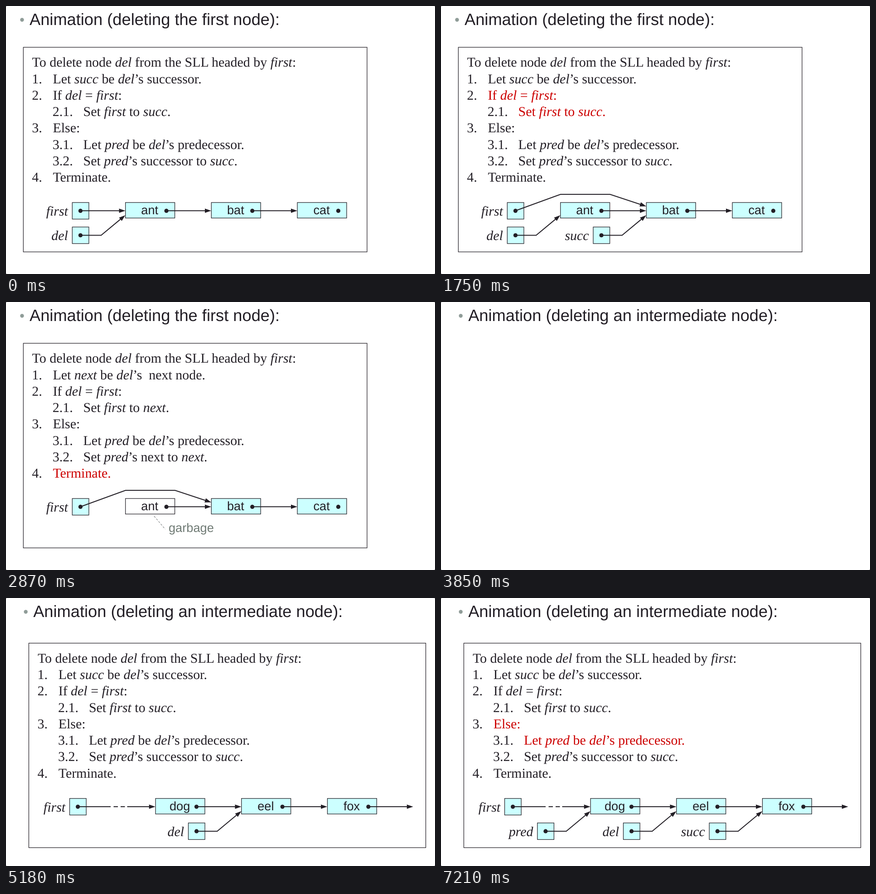
Recreate the animation shown at these times as an HTML page. Size 947 by 592 pixels, loop 8 s.

```html
<!DOCTYPE html>
<html lang="en">
<head>
<meta charset="utf-8">
<title>Deleting a node from a linked list</title>
<style>
html, body { margin: 0; width: 100%; height: 100%; overflow: hidden; background: #fff; }
svg { display: block; width: 947px; height: 592px; }
text {
  white-space: pre; fill: #231f26; text-rendering: geometricPrecision;
  font-kerning: none; font-variant-ligatures: none;
}
.title { font: 36.25px "Liberation Sans", Arial, sans-serif; }
.node { font: 27.2px "Liberation Sans", Arial, sans-serif; }
.step { font: 29.93px "Liberation Serif", "Times New Roman", serif; }
.it { font-style: italic; }
.red { fill: #cc0000; }
.gray { fill: #6f7a74; }
.box { stroke: #231f26; stroke-width: 1.25; }
.line { fill: none; stroke: #231f26; stroke-width: 2; }
.ink { fill: #231f26; }
</style>
</head>
<body>
<svg id="stage" viewBox="0 0 947 592"></svg>
<script>
const LOOP = 8000;
const CYAN = '#ccffff';
const SIDE = 36.6, NODE_W = 108.9, NODE_H = 34.3;

const SUCC_STEPS = [
  ['1.', 'Let *succ* be *del*’s successor.'],
  ['2.', 'If *del* = *first*:'],
  ['2.1.', 'Set *first* to *succ*.'],
  ['3.', 'Else:'],
  ['3.1.', 'Let *pred* be *del*’s predecessor.'],
  ['3.2.', 'Set *pred*’s successor to *succ*.'],
  ['4.', 'Terminate.']
];
const NEXT_STEPS = SUCC_STEPS.map(s => [...s]);
NEXT_STEPS[0][1] = 'Let *next* be *del*’s  next node.';
NEXT_STEPS[2][1] = 'Set *first* to *next*.';
NEXT_STEPS[5][1] = 'Set *pred*’s next to *next*.';

const text = (x, y, cls, s, anchor = 'start') =>
  `<text x="${x}" y="${y}" class="${cls}" text-anchor="${anchor}">${s}</text>`;
const rect = (x, y, w, h, fill) =>
  `<rect class="box" x="${x}" y="${y}" width="${w}" height="${h}" fill="${fill}"/>`;
const dot = (x, y) => `<circle class="ink" cx="${x}" cy="${y}" r="4.6"/>`;
const line = pts => `<polyline class="line" points="${pts.join(' ')}"/>`;

// *word* becomes italic
const rich = s => s.split('*')
  .map((p, i) => i % 2 ? `<tspan class="it">${p}</tspan>` : p).join('');

// Polyline that ends in a filled arrowhead
function arrow(...pts) {
  const [x, y] = pts[pts.length - 1], [px, py] = pts[pts.length - 2];
  const a = Math.atan2(y - py, x - px) * 180 / Math.PI;
  const r = a * Math.PI / 180;
  const neck = [x - 12 * Math.cos(r), y - 12 * Math.sin(r)];
  return line([...pts.slice(0, -1), neck]) +
    `<path class="ink" d="M0 0L-14 -4.8V4.8Z" transform="translate(${x} ${y}) rotate(${a})"/>`;
}

const title = (x, s) =>
  `<circle cx="${x - 16.6}" cy="30.5" r="4.2" fill="#8f9c98"/>` + text(x, 41.5, 'title', s);

function steps(dx, dy, list, red) {
  const top = 134.3 + dy;
  let out = text(57.6 + dx, top, 'step',
    rich('To delete node *del* from the SLL headed by *first*:'));
  list.forEach(([num, body], i) => {
    const sub = num.length > 2, y = top + 36.25 * (i + 1);
    out += text((sub ? 102.8 : 57.3) + dx, y, 'step', num);
    out += text((sub ? 170.6 : 103.4) + dx, y,
      red.includes(i) ? 'step red' : 'step', rich(body));
  });
  return out;
}

function node(x, y, name, fill = CYAN) {
  return rect(x, y, NODE_W, NODE_H, fill) +
    text(x + NODE_W / 2 - 0.9, y + 26, 'node', name, 'middle') +
    dot(x + 90.4, y + 18.3);
}

const variable = (x, y, name) => rect(x, y, SIDE, SIDE, CYAN) +
  text(x - 9.4, y + 29.2, 'step it', name, 'end') + dot(x + 18.1, y + 18.3);

// Variable in the lower row, pointing up at the next node
const lower = (x, y, name) => variable(x, y, name) +
  arrow([x + 18.1, y + 18.3], [x + 63.7, y + 18.3], [x + 117, y - 26]);

function firstScene({ list = SUCC_STEPS, red = [], succ, moved, done }) {
  const y = 434.1, mid = y + 18.2, low = 488.2;
  let out = title(52, 'Animation (deleting the first node):') +
    rect(38.3, 91.2, 758.7, 452, 'none') + steps(0, 0, list, red) +
    variable(146.3, y, 'first') +
    node(263.7, y, 'ant', done ? '#fff' : CYAN) +
    node(453.3, y, 'bat') + node(643.1, y, 'cat') +
    arrow([354, mid], [453, mid]) + arrow([543.6, mid], [643, mid]);
  out += moved
    ? arrow([164.4, mid], [264, 416], [373, 416], [453, 442.5])
    : arrow([164.4, mid], [263.5, mid]);
  if (done) {
    out += '<path d="M327 473L351.5 502" fill="none" stroke="#85898a" stroke-width="1.2" stroke-dasharray="4.5 3"/>' +
      text(359, 508, 'node gray', 'garbage');
  } else {
    out += lower(146.3, low, 'del');
  }
  if (succ) out += lower(336, low, 'succ');
  return out;
}

const middleTitle = () => title(60.2, 'Animation (deleting an intermediate node):');

function middleScene({ red = [], succ, pred }) {
  const y = 442.8, mid = y + 18.2, low = 496.9;
  let out = middleTitle() +
    rect(50.4, 99.7, 876.2, 451.8, 'none') + steps(12.3, 8.6, SUCC_STEPS, red) +
    variable(140.5, y, 'first') +
    line([[158.6, mid], [231, mid]]) + line([[237.5, mid], [247, mid]]) +
    line([[253, mid], [262.5, mid]]) + arrow([267.5, mid], [329.7, mid]);
  ['dog', 'eel', 'fox'].forEach((name, i) => {
    const x = 330.1 + 189.7 * i;
    out += node(x, y, name) + arrow([x + 90.4, mid], [x + 189.3, mid]);
  });
  out += lower(402.5, low, 'del');
  if (succ) out += lower(592.2, low, 'succ');
  if (pred) out += lower(212.8, low, 'pred');
  return out;
}

const scenes = [
  [0, firstScene({})],
  [700, firstScene({ red: [0], succ: true })],
  [1750, firstScene({ red: [1, 2], succ: true, moved: true })],
  [2800, firstScene({ list: NEXT_STEPS, red: [6], moved: true, done: true })],
  [3850, middleTitle()],
  [5040, middleScene({})],
  [6090, middleScene({ red: [0], succ: true })],
  [7210, middleScene({ red: [3, 4], succ: true, pred: true })]
];

const stage = document.getElementById('stage');
const corners = '<path fill="#666" d="M0 0H1.5L0 1.5ZM947 0V1.5L945.5 0ZM0 592V590.5L1.5 592ZM947 592H945.5L947 590.5Z"/>';
stage.innerHTML = scenes.map(([, s]) => `<g display="none">${s}</g>`).join('') + corners;
const groups = [...stage.children].slice(0, scenes.length);
const start = performance.now();
let shown = -1;

function draw() {
  const t = (performance.now() - start) % LOOP;
  const now = scenes.filter(([at]) => at <= t).length - 1;
  if (now !== shown) {
    groups.forEach((g, i) => g.setAttribute('display', i === now ? 'inline' : 'none'));
    shown = now;
  }
  requestAnimationFrame(draw);
}
draw();
</script>
</body>
</html>
```
